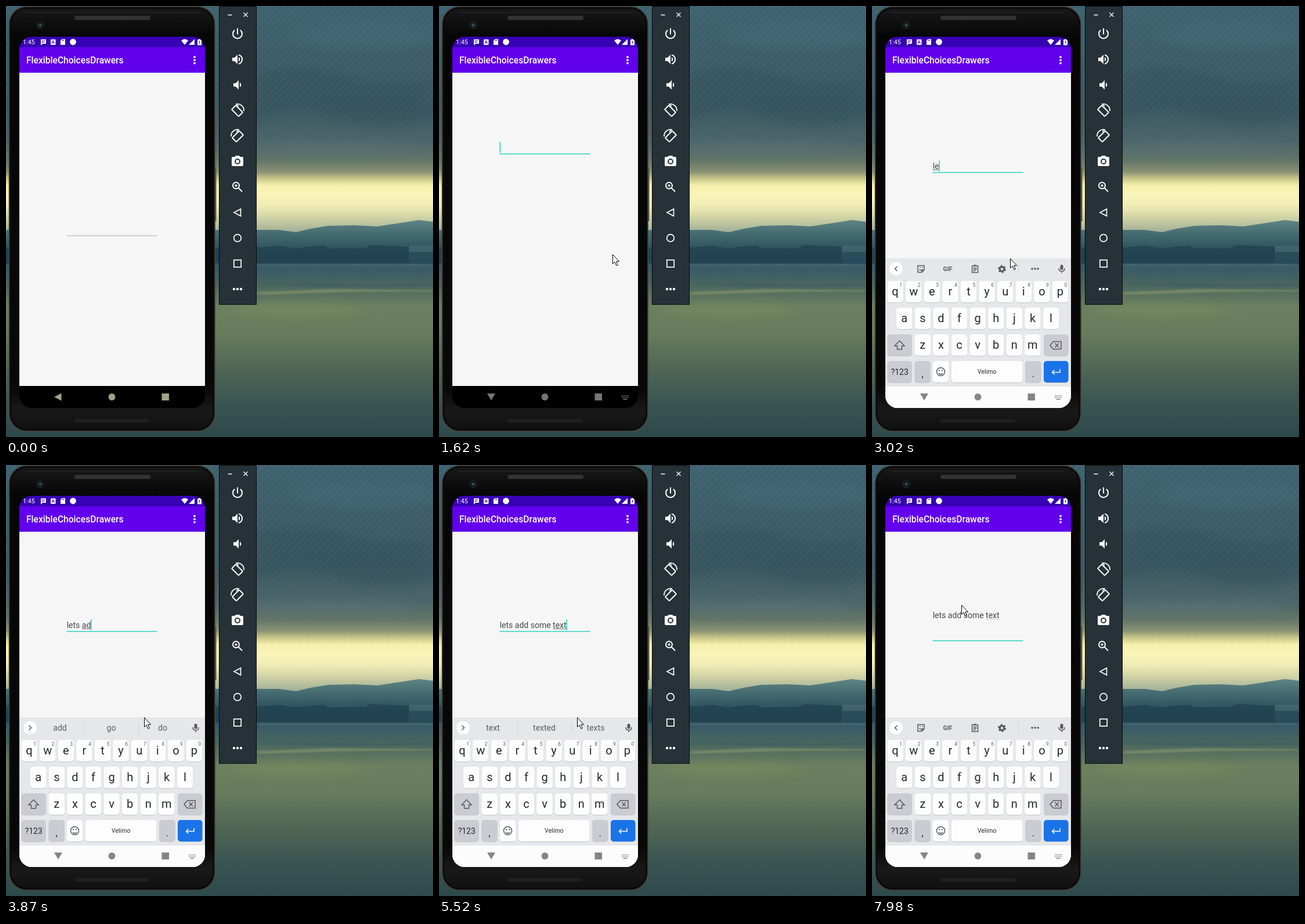
An HTML page for the animation above (8000 ms loop, 736 by 743 pixels).

```html
<!DOCTYPE html>
<html lang="en">
<head>
<meta charset="utf-8">
<title>Typing in a phone emulator</title>
<style>
  html, body { margin: 0; width: 100%; height: 100%; overflow: hidden; background: #2f4a4c; }
  svg { display: block; }
  text { font-family: Roboto, "Open Sans", sans-serif; white-space: pre; }
  .mid { text-anchor: middle; }
  .line { fill: none; stroke: #fff; stroke-width: 2; }
  .tool { fill: none; stroke: #55595e; stroke-width: 1.5; }
</style>
</head>
<body>
<svg width="736" height="743" viewBox="0 0 736 743">
  <defs>
    <linearGradient id="sky" x2="0" y2="1">
      <stop offset="0" stop-color="#3e6270"/>
      <stop offset=".2" stop-color="#3d5d69"/>
      <stop offset=".45" stop-color="#3c5963"/>
      <stop offset=".6" stop-color="#4b666a"/>
      <stop offset=".68" stop-color="#637669"/>
      <stop offset=".73" stop-color="#8b9373"/>
      <stop offset=".76" stop-color="#cbc88a"/>
      <stop offset=".79" stop-color="#f5f0ac"/>
      <stop offset=".83" stop-color="#faf5b9"/>
      <stop offset=".88" stop-color="#efebb4"/>
      <stop offset=".92" stop-color="#d8d8a8"/>
      <stop offset="1" stop-color="#9cab94"/>
    </linearGradient>
    <linearGradient id="hill" x2="0" y2="1">
      <stop offset="0" stop-color="#5f8483"/>
      <stop offset=".35" stop-color="#40676e"/>
      <stop offset=".7" stop-color="#2a4c5b"/>
      <stop offset="1" stop-color="#274858"/>
    </linearGradient>
    <linearGradient id="water" x2="0" y2="1">
      <stop offset="0" stop-color="#35576a"/>
      <stop offset=".12" stop-color="#49665f"/>
      <stop offset=".25" stop-color="#6b8060"/>
      <stop offset=".4" stop-color="#677c5c"/>
      <stop offset=".6" stop-color="#506755"/>
      <stop offset=".8" stop-color="#3b5553"/>
      <stop offset="1" stop-color="#2e494c"/>
    </linearGradient>
    <linearGradient id="shell" x2="0" y2="1">
      <stop offset="0" stop-color="#1a1a1a"/>
      <stop offset=".07" stop-color="#060606"/>
      <stop offset=".9" stop-color="#080808"/>
      <stop offset=".95" stop-color="#191919"/>
      <stop offset="1" stop-color="#101010"/>
    </linearGradient>
    <linearGradient id="fade" x2="0" y2="1">
      <stop offset=".5" stop-color="#fff"/>
      <stop offset="1" stop-color="#000"/>
    </linearGradient>
    <mask id="fadeMask"><rect width="736" height="285" fill="url(#fade)"/></mask>
    <pattern id="hatch" width="8" height="8" patternUnits="userSpaceOnUse" patternTransform="rotate(45)">
      <path d="M4 0V8" stroke="#86a0a0" stroke-width="1" opacity=".22"/>
    </pattern>
    <pattern id="mesh" width="3" height="3" patternUnits="userSpaceOnUse">
      <path d="M0 3L3 0" stroke="#555" stroke-width=".8"/>
    </pattern>
    <filter id="soft" x="-30%" y="-60%" width="160%" height="220%"><feGaussianBlur stdDeviation="14 8"/></filter>
    <filter id="blur"><feGaussianBlur stdDeviation="5 1"/></filter>
    <clipPath id="screen"><rect x="23" y="53" width="320" height="640" rx="21"/></clipPath>
  </defs>

  <!-- backdrop -->
  <rect width="736" height="392" fill="url(#sky)"/>
  <g filter="url(#soft)" opacity=".5">
    <path d="M432 120Q500 95 590 122T736 120V195Q640 220 560 190T432 200Z" fill="#32505c"/>
    <ellipse cx="620" cy="50" rx="130" ry="24" fill="#446a79"/>
    <ellipse cx="560" cy="245" rx="150" ry="10" fill="#5d7578"/>
  </g>
  <rect width="736" height="285" fill="url(#hatch)" mask="url(#fadeMask)"/>
  <path d="M0 386H470L500 390 525 384 555 379 600 378 640 380 680 374 712 369 736 372V450H0Z" fill="url(#hill)"/>
  <path d="M0 416H440L470 413 500 418 520 415 548 413 556 418 620 417 628 412 694 415V443H0Z" fill="#203f4f" opacity=".7"/>
  <rect x="695" y="413" width="41" height="11" fill="#55747a" opacity=".45"/>
  <rect y="444" width="736" height="299" fill="url(#water)"/>
  <g filter="url(#blur)">
    <path d="M432 446H736V448H432Z" fill="#6b8576" opacity=".5"/>
    <path d="M432 493L560 488 736 490V492L600 493 432 498Z" fill="#8e9c6a" opacity=".55"/>
    <path d="M432 480L520 477 640 481 736 478V483L560 485Z" fill="#365864" opacity=".4"/>
  </g>
  <ellipse cx="500" cy="524" rx="120" ry="12" fill="#82925f" opacity=".4" filter="url(#soft)"/>

  <!-- phone -->
  <path d="M361 177V222M361 278V371" stroke="#55564e" stroke-width="3"/>
  <rect x="5.500" y="1" width="354.500" height="732" rx="30" fill="url(#shell)" stroke="#45443d" stroke-width="1.600"/>
  <rect x="8" y="3.500" width="349.500" height="727" rx="28" fill="none" stroke="#0b0b0b" stroke-width="2.500"/>
  <path d="M34 11H332" stroke="#2c2c2c"/>
  <rect x="118" y="17" width="131" height="7" rx="3.500" fill="#262626"/>
  <rect x="118" y="17" width="131" height="7" rx="3.500" fill="url(#mesh)"/>
  <rect x="118" y="712" width="129" height="6" rx="3" fill="url(#mesh)" opacity=".65"/>
  <circle cx="59" cy="33" r="6" fill="#11191d" stroke="#2b3032"/>
  <circle cx="59" cy="33" r="2.500" fill="#31505d"/>
  <rect x="23" y="53" width="320" height="640" rx="21" fill="#000"/>

  <g clip-path="url(#screen)">
    <rect x="23" y="53" width="320" height="18" fill="#3700b3"/>
    <rect x="23" y="71" width="320" height="44" fill="#6200ee"/>
    <rect x="23" y="115" width="320" height="540" fill="#f6f6f6"/>
    <g fill="#fff">
      <text x="29" y="66" font-size="10.800">1:45</text>
      <path d="M60 57.500H69V65H63L60 68Z"/>
      <rect x="77" y="57.500" width="8.500" height="9.500" rx="1"/>
      <path d="M96.500 57H102V67H94V59.500Z"/>
      <circle cx="115.500" cy="62" r="5.400"/>
      <path d="M302 59.500Q308 54.500 314 59.500L308 67Z"/>
      <path d="M315 67L325 57V67Z"/>
      <path d="M332 57H335V58H337V67.500H330V58H332Z"/>
      <text x="35" y="99" font-size="15.600" font-weight="500">FlexibleChoicesDrawers</text>
      <circle cx="325" cy="88" r="1.900"/><circle cx="325" cy="93.300" r="1.900"/><circle cx="325" cy="98.600" r="1.900"/>
    </g>
    <g stroke="#3700b3" fill="none">
      <path d="M61.500 60H67.500M61.500 62.500H66M97.500 58V60.500M99.500 58V60.500M333.500 60V65"/>
      <path d="M79 65L81.200 59.500 83.500 65M80 63.300H82.500"/>
    </g>

    <!-- field -->
    <path id="rule" d="M104.500 0H260.500" stroke-width="1.500"/>
    <text id="entry" x="104.700" font-size="14" fill="#46484a"><tspan id="head"></tspan><tspan id="word"></tspan></text>
    <rect id="underline" height="1"/>
    <path id="caret" d="M0 -21V-2" stroke="#22d0bf" stroke-width="1.500"/>

    <!-- keyboard -->
    <g id="board">
      <rect x="23" y="435" width="320" height="258" fill="#e5e7ea"/>
      <g id="keys"></g>
      <circle cx="41.500" cy="453" r="12" fill="#fdfdfd" stroke="#d8dade" stroke-width=".6"/>
      <path id="chevron" d="M2 -4L-2 0 2 4" class="tool"/>
      <g id="tools" class="tool">
        <path d="M79 447.500H90V455L86 459H79ZM90 455H86V459M81.500 454Q84 457 87 454"/>
        <path d="M82 450.500H83.500M86 450.500H87.500"/>
        <text class="mid" x="130.500" y="456.500" font-size="10.500" font-weight="700" fill="#55595e" stroke="none">GIF</text>
        <path d="M172.500 448H182.500V459.500H172.500ZM175 447H180M174.500 451.500H180.500M174.500 454H180.500M174.500 456.500H178.500"/>
        <circle cx="224" cy="453.500" r="3.800" stroke-width="3"/>
        <circle cx="224" cy="453.500" r="5.800" stroke-width="2.200" stroke-dasharray="3 3.070"/>
        <path d="M252.500 444V462" stroke="#d0d3d7" stroke-width="1"/>
        <path d="M276 453H286.500" stroke-width="3.600" stroke-linecap="round" stroke-dasharray="0 5"/>
      </g>
      <g id="hints" font-size="14" fill="#5a5e63" class="mid">
        <path d="M135.500 444V462M228.500 444V462" stroke="#cdd0d4"/>
        <text x="93" y="458"></text><text x="181.500" y="458"></text><text x="270" y="458"></text>
      </g>
      <rect x="324.500" y="446" width="5" height="9" rx="2.500" fill="#55595e"/>
      <path class="tool" d="M322 452Q322 457.500 327 457.500T332 452M327 457.500V460.500"/>
      <g class="tool">
        <path d="M47.500 577L56 586H51.500V592H43.500V586H39Z"/>
        <path d="M307 585L312.500 578.500H326V591.500H312.500ZM315.500 581.500L322 588.500M322 581.500L315.500 588.500"/>
        <circle cx="118.500" cy="630.500" r="7"/>
        <path d="M115 633Q118.500 637 122 633"/>
        <path d="M115 628.500H117M120 628.500H122" stroke-width="2"/>
        <path d="M324 626V631.500H310.500M314.500 627.500L310.500 631.500 314.500 635.500" stroke="#fff"/>
      </g>
      <rect x="23" y="656" width="320" height="37" fill="#fcfcfc"/>
    </g>

    <!-- navigation -->
    <g id="nav">
      <path id="back"/>
      <circle cx="182.500" cy="674" r="5.900"/>
      <rect x="268.500" y="668" width="12.500" height="12"/>
      <g id="switcher" fill="none" stroke="#808080" stroke-width="1.600">
        <path d="M315 672H327M315 675H327" stroke-dasharray="1.600 1"/>
        <path d="M317.500 678H324.500"/>
      </g>
    </g>
  </g>

  <!-- emulator panel -->
  <rect x="367.500" y=".5" width="64" height="514" fill="#263238" stroke="#05080a"/>
  <path class="line" d="M382.500 15.500H389.500M409.500 11.500L416.500 18.500M416.500 11.500L409.500 18.500" style="stroke-width:1.300"/>
  <g transform="translate(399 48)" class="line">
    <path d="M0 -9.500V1M4.800 -6.500A8 8 0 1 1 -4.800 -6.500"/>
  </g>
  <g fill="#fff">
    <path transform="translate(387 80)" d="M3 9v6h4l5 5V4L7 9zM14 8v8a4.500 4.500 0 0 0 0-8zM14 3.200v2.100a7 7 0 0 1 0 13.400v2.100a9 9 0 0 0 0-17.600z"/>
    <path transform="translate(387 124)" d="M5 9v6h4l5 5V4L9 9zM16 8v8a4.500 4.500 0 0 0 0-8z"/>
    <path transform="translate(387 256)" d="M9 2L7.200 4H4a2 2 0 0 0-2 2v12a2 2 0 0 0 2 2h16a2 2 0 0 0 2-2V6a2 2 0 0 0-2-2h-3.200L15 2z"/>
    <circle cx="393" cy="488" r="2.200"/><circle cx="399" cy="488" r="2.200"/><circle cx="405" cy="488" r="2.200"/>
  </g>
  <circle cx="399" cy="268" r="4" fill="#fff" stroke="#263238" stroke-width="2"/>
  <g id="turn" transform="translate(399 180)" class="line">
    <rect x="-5" y="-8.500" width="10" height="17" rx="1" transform="translate(-.5 .8) rotate(-45)"/>
    <path d="M-3 -10.600A11 11 0 0 1 11 1M-2 -11L2 -7" stroke-width="1.700"/>
  </g>
  <use href="#turn" transform="translate(798 44) scale(-1 1)"/>
  <g transform="translate(399 312)" class="line">
    <circle cx="-2.500" cy="-2.500" r="5.500"/>
    <path d="M1.500 1.500L8 8"/>
    <path d="M-5 -2.500H0M-2.500 -5V0" style="stroke-width:1.300"/>
  </g>
  <g class="line" style="stroke-width:1.700">
    <path d="M404.500 350V362L393 356Z"/>
    <circle cx="399" cy="400" r="6.300"/>
    <rect x="392.800" y="437.800" width="12.400" height="12.400"/>
  </g>

  <path id="mouse" d="M.5 .5V16.500L4 13.300 7 19.800 9.300 18.700 6.500 12.300H11.500Z" fill="#fff" stroke="#000"/>
</svg>
<script>
const $ = id => document.getElementById(id);
const LOOP = 8000;

// Keyboard keys
let markup = "";
function key(x, y, w, label = "", { fill = "#fdfdfd", size = 20, dy = 25, hint = "" } = {}) {
  const mid = x + w / 2;
  markup += `<rect x="${x}" y="${y + 1}" width="${w}" height="37" rx="5" fill="#c3c6cb"/>
    <rect x="${x}" y="${y}" width="${w}" height="37" rx="5" fill="${fill}"/>
    <text class="mid" x="${mid}" y="${y + dy}" font-size="${size}" fill="#25272a">${label}</text>
    <text class="mid" x="${mid + 9.5}" y="${y + 10}" font-size="8.5" fill="#5a5e63">${hint}</text>`;
}
function row(letters, x, y, hints = "") {
  [...letters].forEach((c, i) => key(x + i * 31.6, y, 27.5, c, { hint: hints[i] }));
}
const grey = "#caccd2";
row("qwertyuiop", 26.3, 474, "1234567890");
row("asdfghjkl", 42, 520);
row("zxcvbnm", 73.5, 566);
key(26.5, 566, 42.5, "", { fill: grey });
key(296, 566, 42.5, "", { fill: grey });
key(26.5, 612, 42.5, "?123", { fill: grey, size: 14, dy: 24 });
key(73.5, 612, 27.5, ",", { fill: grey, size: 17, dy: 28 });
key(105, 612, 27.5);
key(137, 612, 122.5, "Velimo", { size: 10.5, dy: 22 });
key(264, 612, 27.5, ".", { fill: grey, size: 17, dy: 28 });
key(296, 612, 42.5, "", { fill: "#1a73e8" });
$("keys").innerHTML = markup;

// Each entry: time, text, suggestions (none shows the tool row)
const typing = [
  [0, "", ""],
  [2850, "l", ""],
  [3020, "le", ""],
  [3090, "le", "let lets left"],
  [3250, "let", "let lets left"],
  [3320, "lets", "let lets left"],
  [3400, "lets", "lets let let's"],
  [3630, "lets a", "lets let let's"],
  [3720, "lets a", "add go do"],
  [3870, "lets ad", "add go do"],
  [3950, "lets ad", "ad add ads"],
  [4020, "lets add", "ad add ads"],
  [4100, "lets add", "add added adds"],
  [4270, "lets add ", "add added adds"],
  [4340, "lets add s", "a the to"],
  [4420, "lets add s", "some so something"],
  [4500, "lets add so", "some so something"],
  [4580, "lets add som", "so some something"],
  [4650, "lets add some", "some something someone"],
  [4800, "lets add some t", "some something someone"],
  [4890, "lets add some t", ""],
  [4960, "lets add some te", ""],
  [5040, "lets add some te", "the to them"],
  [5120, "lets add some tex", "the to them"],
  [5290, "lets add some text", "tex text ten"],
  [5520, "lets add some text", "text texted texts"],
  [7290, "lets add some text", ""]
];

// Pointer legs: start, end, from, to, number of jumps
const legs = [
  [210, 610, [576, 672], [132, 400], 5],
  [1080, 1620, [132, 400], [299, 428], 7],
  [1620, 1780, [299, 428], [238, 435], 2],
  [7600, 7980, [238, 435], [154, 241], 5]
];
function pointer(t) {
  const [start, end, a, b, n] = legs.findLast(leg => t >= leg[0]) || legs[0];
  const p = Math.min(1, Math.floor((t - start) / (end - start) * n + 1e-6) / n);
  return a.map((v, i) => v + (b[i] - v) * p);
}

const within = (t, a, b) => t >= a && t < b;
const show = (id, on) => $(id).setAttribute("visibility", on ? "inherit" : "hidden");
const move = (id, x, y) => $(id).setAttribute("transform", `translate(${x} ${y})`);
const paint = (id, attrs) => Object.entries(attrs).forEach(([k, v]) => $(id).setAttribute(k, v));
const hintTexts = $("hints").querySelectorAll("text");

function draw(t) {
  const focused = t >= 840, panned = t >= 1320, open = t >= 1700;
  const [, text, hints] = typing.findLast(s => t >= s[0]);
  const breaks = (t >= 6830) + (t >= 7060);
  const base = t >= 1780 ? 287 : panned ? 255 : 396;
  const ruleY = base + breaks * 8;
  const textY = base - 6.5 - breaks * 8.2;

  move("rule", 0, ruleY);
  paint("rule", { stroke: focused ? "#2bd2c2" : "#c4c4c4" });

  const cut = text.lastIndexOf(" ") + 1;
  $("head").textContent = text.slice(0, cut);
  $("word").textContent = text.slice(cut);
  $("entry").setAttribute("y", textY);

  const headWidth = cut ? $("head").getComputedTextLength() : 0;
  const width = text ? $("entry").getComputedTextLength() : 0;
  paint("underline", {
    x: 104.7 + headWidth, y: textY + 1.5, width: width - headWidth,
    fill: breaks ? "#c8c8c8" : "#6a6c6e"
  });
  show("underline", text.length - cut > 1);

  move("caret", 105.3 + (breaks ? 0 : width), ruleY);
  show("caret", focused && !within(t, 2160, 2630) && !within(t, 5980, 6440) && t < 7680);

  show("board", open);
  move("board", 0, t < 1780 ? 60 : 0);
  show("tools", !hints);
  show("hints", hints);
  $("chevron").setAttribute("transform", `translate(41.5 453) scale(${hints ? -1 : 1} 1)`);
  hints.split(" ").forEach((word, i) => hintTexts[i].textContent = word);

  const down = t >= 1240;
  paint("nav", { fill: open ? "#858585" : down ? "#757575" : "#a0a585" });
  paint("back", { d: down ? "M83 668H97L90 680Z" : "M95.5 667.5V680.5L83 674Z" });
  show("switcher", down);

  move("mouse", ...pointer(t));
  show("mouse", t >= 210);
}

const began = performance.now();
function tick() {
  draw((performance.now() - began) % LOOP);
  requestAnimationFrame(tick);
}
tick();
</script>
</body>
</html>
```
